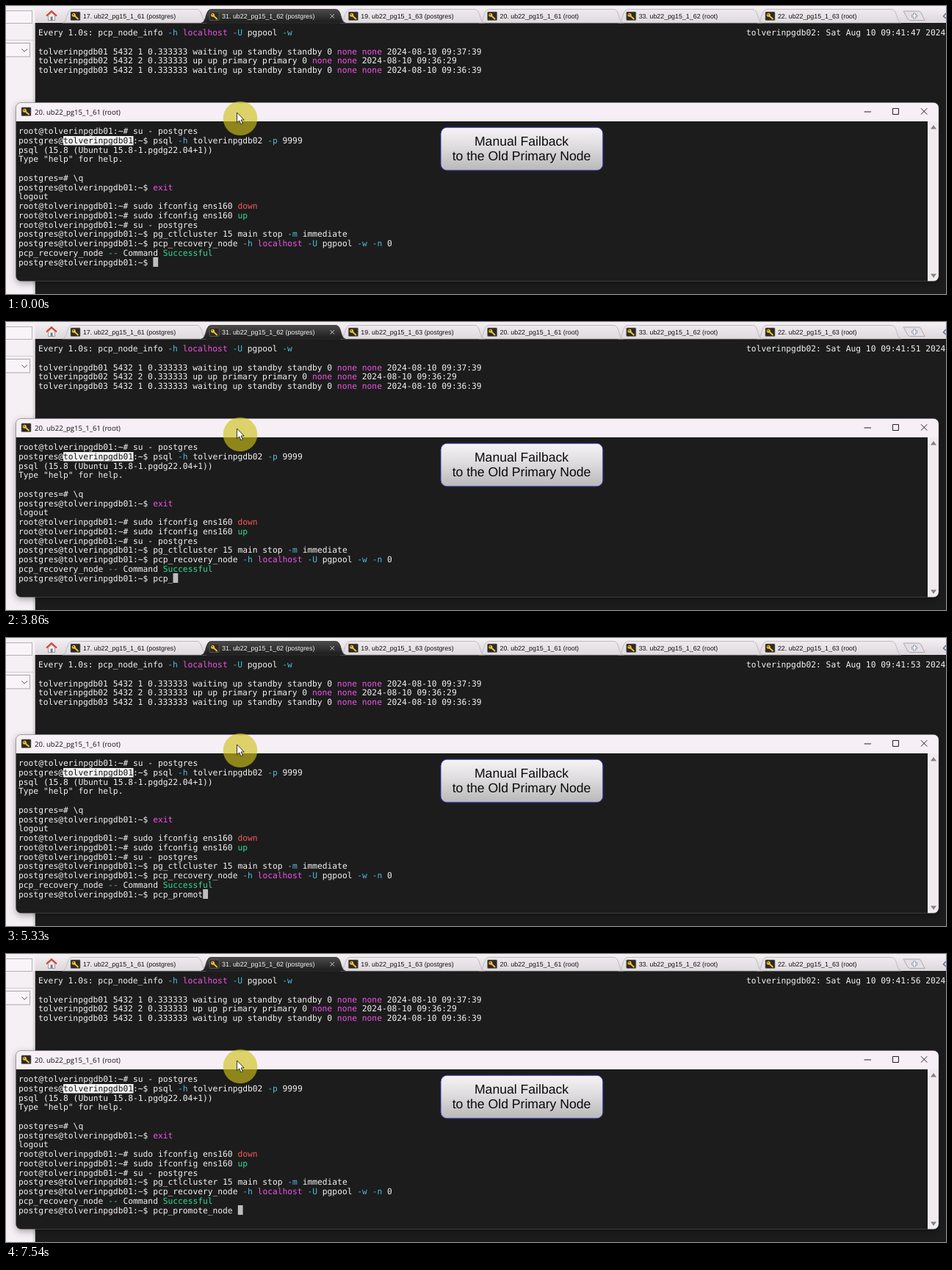
These frames come from a looping animation (1280x392 px, 8000 ms). An HTML page:

```html
<!DOCTYPE html>
<html lang="en">
<head>
<meta charset="utf-8">
<title>Manual failback</title>
<style>
  html, body { margin: 0; width: 100%; height: 100%; overflow: hidden; background: #1c1c1c; }
  svg { display: block; width: 100vw; height: 100vh; }
  text { white-space: pre; text-rendering: geometricPrecision; }
  .mono { font: 11.28px "DejaVu Sans Mono", monospace; fill: #f1f1f1; }
  .tab { font: 8.9px "Liberation Sans", Arial, sans-serif; }
  .title { font: 9.58px "Open Sans", "Noto Sans", sans-serif; fill: #111; }
  .note { font: 17.6px "Liberation Sans", Arial, sans-serif; text-anchor: middle; fill: #0a0a0a; }
  .m { fill: #ee52e6; }
  .c { fill: #4fbcd8; }
  .r { fill: #f65757; }
  .g { fill: #30da90; }
  .k { fill: #161616; }
</style>
</head>
<body>
<svg viewBox="0 0 1280 392" preserveAspectRatio="none">
  <defs>
    <linearGradient id="strip" x2="0" y2="1">
      <stop stop-color="#f5f0f4"/><stop offset="1" stop-color="#dcd7db"/>
    </linearGradient>
    <linearGradient id="tabFill" x2="0" y2="1">
      <stop stop-color="#efeaee"/><stop offset="1" stop-color="#dfdade"/>
    </linearGradient>
    <linearGradient id="activeFill" x2="0" y2="1">
      <stop stop-color="#4a4b4a"/><stop offset="1" stop-color="#1c1c1c"/>
    </linearGradient>
    <linearGradient id="noteFill" x2="0" y2="1">
      <stop stop-color="#f7f3f6"/><stop offset=".45" stop-color="#dedcde"/><stop offset="1" stop-color="#b9b8b9"/>
    </linearGradient>
    <filter id="shadow" x="-5%" y="-10%" width="110%" height="125%">
      <feDropShadow dx="0" dy="3" stdDeviation="5" flood-opacity=".35"/>
    </filter>
    <clipPath id="frame"><rect x="13.5" y="131.5" width="1256.5" height="243" rx="7"/></clipPath>
    <g id="key">
      <rect width="13" height="11.5" rx="1" fill="#2c2a25" stroke="#77736b" stroke-width=".6"/>
      <path d="M5 5 L10.5 10" stroke="#f2c12e" stroke-width="1.9"/>
      <circle cx="4.3" cy="4.2" r="2.5" fill="#f2c12e"/>
      <circle cx="3.7" cy="3.6" r=".8" fill="#2c2a25"/>
    </g>
  </defs>

  <rect width="1280" height="392" fill="#1c1c1c"/>
  <rect width="1280" height="23" fill="url(#strip)"/>

  <g id="side">
    <rect width="39.5" height="392" fill="#f5f0f4"/>
    <rect x="36.5" y="23" width="3" height="369" fill="#e0dbdf"/>
    <rect x="-2" y="6.5" width="37.5" height="17" fill="#f8f4f7" stroke="#b5b0b4"/>
    <path d="M0 46.5 H37" stroke="#d2cdd1"/>
    <rect x="-2" y="50.5" width="34.5" height="18.5" fill="#f8f4f7" stroke="#aaa5a9"/>
    <path d="M21.5 58.5 L25.2 62 L29 58.5" fill="none" stroke="#555"/>
  </g>

  <g id="tabs"></g>
  <g id="home">
    <path d="M55 13.5 L62 7 L69 13.5" fill="none" stroke="#d63a2c" stroke-width="2"/>
    <path d="M57.5 13 L62 9 L66.5 13 V19.5 H57.5 Z" fill="#f4eee8" stroke="#8d8580" stroke-width=".8"/>
    <rect x="60.7" y="14.5" width="2.8" height="5" fill="#5b7ea8"/>
  </g>
  <path d="M441.5 11 L447 16.5 M447 11 L441.5 16.5" stroke="#c9c9c9"/>
  <path d="M1222 7 H1243 Q1246 7 1248 13 L1251 19.5 H1231 Q1228 19.5 1226 14 Z" fill="#e4e0e5" stroke="#a5a1aa" stroke-width=".9"/>
  <path d="M1237 9.5 V17.5 M1233 13.5 H1241" stroke="#8690a3" stroke-width="3.4"/>
  <path d="M1237 10.3 V16.7 M1233.8 13.5 H1240.2" stroke="#fff" stroke-width="1.7"/>
  <path d="M1280 10 L1276.5 14 L1280 17" fill="none" stroke="#4b6aa8" stroke-width="1.4"/>

  <g id="watch"></g>

  <rect x="13.5" y="131.5" width="1256.5" height="243" rx="7" fill="#1c1c1c" filter="url(#shadow)"/>
  <g clip-path="url(#frame)">
    <rect x="13" y="131" width="1258" height="26" fill="#f6eff5"/>
    <rect x="1255" y="157" width="16" height="218" fill="#f0ebef"/>
    <path d="M1259 167.5 L1263 162 L1267 167.5 Z M1259 364.5 L1263 370 L1267 364.5 Z" fill="#858185"/>
  </g>
  <rect x="13.5" y="131.5" width="1256.5" height="243" rx="7" fill="none" stroke="#7a767a" stroke-opacity=".55" stroke-width=".7"/>
  <use href="#key" x="21" y="138"/>
  <text class="title" x="39" y="147.5">20. ub22_pg15_1_61 (root)</text>
  <path d="M1168.5 144 H1178 M1207.5 139.5 H1215.5 V147.5 H1207.5 Z M1246 139.3 L1254.3 147.6 M1254.3 139.3 L1246 147.6" fill="none" stroke="#222"/>

  <rect x="78" y="177" width="95.5" height="12.5" fill="#f2f2f2"/>
  <g id="shell"></g>
  <rect id="caret" y="342" width="6.8" height="13" fill="#bdbdbd"/>

  <rect x="592" y="165.2" width="220.8" height="58.6" rx="8.5" fill="url(#noteFill)" stroke="#3434b4"/>
  <text class="note" x="702" y="189.6">Manual Failback</text>
  <text class="note" x="702" y="210">to the Old Primary Node</text>

  <circle cx="319" cy="153" r="23.3" fill="#cfc21c" opacity=".64"/>
  <path d="M314.5 145 V158.8 L317.7 155.9 L319.9 160.8 L322.2 159.8 L320 155 H324.2 Z" fill="#fff" stroke="#222" stroke-width=".9"/>
</svg>

<script>
const CELL = 6.79, ROW = 12.75, LOOP = 8000;
const WATCH_X = 43.9, SHELL_X = 17;
const byId = id => document.getElementById(id);

function add(parent, name, attrs, label) {
  const el = document.createElementNS("http://www.w3.org/2000/svg", name);
  for (const key in attrs) el.setAttribute(key, attrs[key]);
  if (label !== undefined) el.textContent = label;
  parent.append(el);
  return el;
}

// "[m|word]" gives the word the colour class m.
function line(parent, x, y, source) {
  const row = add(parent, "text", { class: "mono", x, y });
  for (const part of source.split(/(\[\w\|[^\]]*\])/)) {
    const hit = /^\[(\w)\|(.*)\]$/.exec(part);
    if (hit) add(row, "tspan", { class: hit[1] }, hit[2]);
    else row.append(part);
  }
  return row;
}

function tab(label, i) {
  const x = 77 + i * 189.2, active = i === 1, end = x + 196;
  add(byId("tabs"), "path", {
    d: `M${x} 23 C${x + 7} 22 ${x + 5} 4.5 ${x + 13} 4.5 H${end - 13} C${end - 5} 4.5 ${end - 7} 22 ${end} 23 Z`,
    fill: active ? "url(#activeFill)" : "url(#tabFill)",
    stroke: active ? "#343234" : "#b4afb3",
    "stroke-width": .8
  });
  add(byId("tabs"), "use", { href: "#key", x: x + 11, y: 8 });
  add(byId("tabs"), "text", { class: "tab", x: x + 27.9, y: 17.2, fill: active ? "#f4f4f4" : "#111" }, label);
}

const labels = ["17. ub22_pg15_1_61 (postgres)", "31. ub22_pg15_1_62 (postgres)",
  "19. ub22_pg15_1_63 (postgres)", "20. ub22_pg15_1_61 (root)",
  "33. ub22_pg15_1_62 (root)", "22. ub22_pg15_1_63 (root)"];
[5, 4, 3, 2, 0, 1].forEach(i => tab(labels[i], i));

const host = "tolverinpgdb";
const root = `root@${host}01:~# `;
const user = `postgres@${host}01:~$ `;
const login = "[c|-h] [m|localhost] [c|-U] pgpool [c|-w]";

[
  `Every 1.0s: pcp_node_info ${login}`,
  "",
  `${host}01 5432 1 0.333333 waiting up standby standby 0 [m|none] [m|none] 2024-08-10 09:37:39`,
  `${host}02 5432 2 0.333333 up up primary primary 0 [m|none] [m|none] 2024-08-10 09:36:29`,
  `${host}03 5432 1 0.333333 waiting up standby standby 0 [m|none] [m|none] 2024-08-10 09:36:39`
].forEach((s, i) => line(byId("watch"), WATCH_X, 40 + i * ROW, s));
const clock = line(byId("watch"), WATCH_X + 142 * CELL, 40, "");

[
  `${root}su - postgres`,
  `postgres@[k|${host}01]:~$ psql [c|-h] ${host}02 [c|-p] 9999`,
  "psql (15.8 (Ubuntu 15.8-1.pgdg22.04+1))",
  'Type "help" for help.',
  "",
  "postgres=# \\q",
  `${user}[m|exit]`,
  "logout",
  `${root}sudo ifconfig ens160 [r|down]`,
  `${root}sudo ifconfig ens160 [g|up]`,
  `${root}su - postgres`,
  `${user}pg_ctlcluster 15 main stop [c|-m] immediate`,
  `${user}pcp_recovery_node ${login} [c|-n] 0`,
  "pcp_recovery_node [c|--] Command [g|Successful]"
].forEach((s, i) => line(byId("shell"), SHELL_X, 174 + i * ROW, s));
const prompt = line(byId("shell"), SHELL_X, 174 + 14 * ROW, user);

const command = "pcp_promote_node ";
// Pairs of start time and value.
const typed = [[0, 0], [2870, 1], [2990, 3], [3860, 4], [4350, 5], [4840, 7], [5090, 8], [5210, 9],
  [5330, 10], [5450, 11], [6320, 12], [7060, 13], [7180, 14], [7300, 15], [7420, 16], [7540, 17]];
const seconds = [[0, 47], [120, 48], [1120, 49], [2120, 50], [3240, 51], [4350, 52], [5330, 53],
  [6440, 54], [7540, 56]];
const valueAt = (steps, t) => steps.reduce((v, [start, next]) => t >= start ? next : v, 0);

function draw(t) {
  const count = valueAt(typed, t);
  prompt.textContent = user + command.slice(0, count);
  byId("caret").setAttribute("x", SHELL_X + (user.length + count) * CELL);
  clock.textContent = `${host}02: Sat Aug 10 09:41:${valueAt(seconds, t)} 2024`;
}

const begin = performance.now();
function tick() {
  draw((performance.now() - begin) % LOOP);
  requestAnimationFrame(tick);
}
tick();
</script>
</body>
</html>
```
